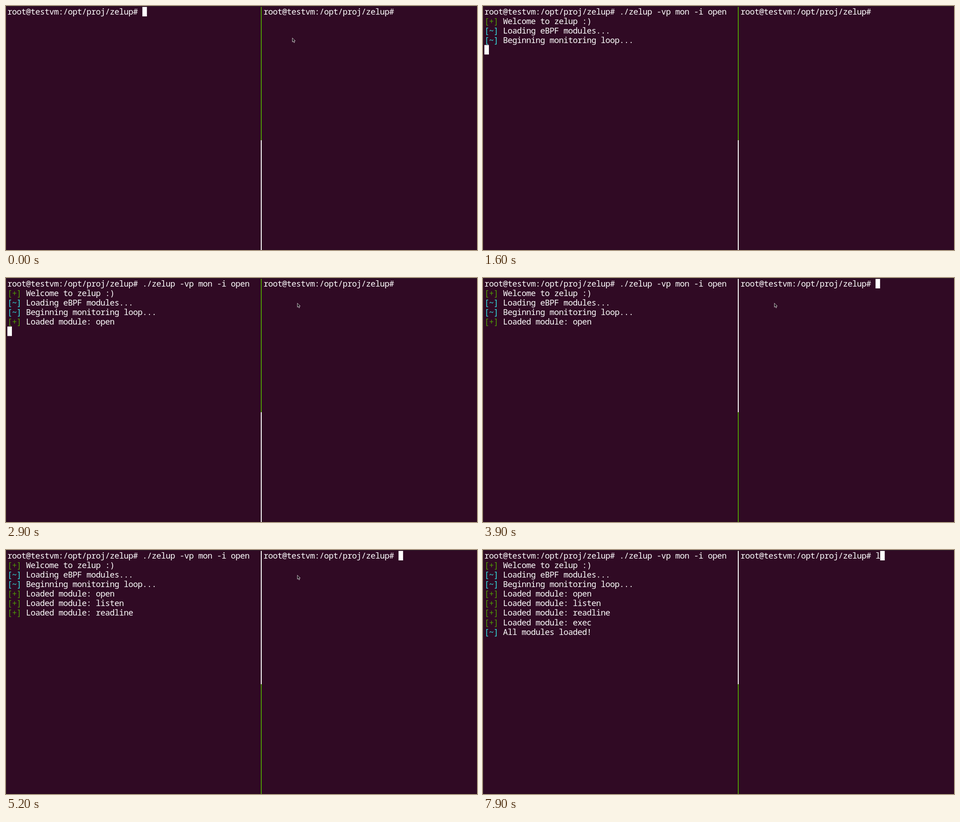
An HTML page that plays this animation: 1037x540 px, repeating every 8000 ms.

```html
<!DOCTYPE html>
<html lang="en">
<head>
<meta charset="utf-8">
<title>Split terminal</title>
<style>
  :root { --col: 10.25px; --row: 21.08px; --green: #4e9a06; --cyan: #34e2e2; }
  html, body { margin: 0; width: 100%; height: 100%; overflow: hidden; background: #300a24; }
  #stage {
    position: relative; width: 1037px; height: 540px; overflow: hidden;
    box-sizing: border-box; background: #300a24;
    box-shadow: inset 0 1px #2c2229, inset 1px 0 #2f1b25, inset 0 -1px #290a20;
  }
  #stage > * { position: absolute; }
  pre {
    margin: 0; top: 2px; color: #fff;
    font: 18px/var(--row) "Noto Sans Mono", "DejaVu Sans Mono", monospace;
    letter-spacing: -.55px; font-variant-ligatures: none;
  }
  .left { left: 3px; }
  .right { left: 567px; }
  .ok { color: var(--green); }
  .info { color: var(--cyan); }
  .ok, .info { font-weight: 500; }

  .cursor { top: 1.6px; width: var(--col); height: var(--row); background: #fff; }
  .divider { left: 561px; width: 2px; }
  .upper { top: 2px; height: 295px; background: var(--green); }
  .lower { top: 297px; height: 243px; background: #fff; }
  #mouse { left: 0; top: 0; overflow: visible; }

  /* 1% of the loop is 80 ms; every change is a hard cut */
  .step, .cursor, .divider, #mouse { animation: 8s step-end infinite; }
  .command { animation-name: command; }
  .boot { animation-name: boot; }
  .open { animation-name: open; }
  .listen { animation-name: listen; }
  .readline { animation-name: readline; }
  .exec { animation-name: exec; }
  .typed { animation-name: typed; }
  .cursor.left { animation-name: left-cursor; }
  .cursor.right { animation-name: right-cursor; }
  .upper { animation-name: upper; }
  .lower { animation-name: lower; }
  #mouse { animation-name: mouse; }

  @keyframes command { 0% { opacity: 0 } 15%, 100% { opacity: 1 } }
  @keyframes boot { 0% { opacity: 0 } 20%, 100% { opacity: 1 } }
  @keyframes open { 0% { opacity: 0 } 26.25%, 100% { opacity: 1 } }
  @keyframes listen { 0% { opacity: 0 } 60%, 100% { opacity: 1 } }
  @keyframes readline { 0% { opacity: 0 } 65%, 100% { opacity: 1 } }
  @keyframes exec { 0% { opacity: 0 } 88.75%, 100% { opacity: 1 } }
  @keyframes typed { 0% { opacity: 0 } 98.75%, 100% { opacity: 1 } }
  @keyframes upper { 0% { background: var(--green) } 38.75%, 100% { background: #fff } }
  @keyframes lower { 0% { background: #fff } 38.75%, 100% { background: var(--green) } }

  @keyframes left-cursor {
    0%, 12.5% { opacity: 1; transform: translate(calc(29 * var(--col)), 0) }
    3.75% { opacity: 0; transform: translate(calc(29 * var(--col)), 0) }
    15% { opacity: 1; transform: translate(calc(52 * var(--col)), 0) }
    20% { opacity: 1; transform: translate(0, calc(4 * var(--row))) }
    26.25% { opacity: 0; transform: translate(0, calc(5 * var(--row))) }
    32.5% { opacity: 1; transform: translate(0, calc(5 * var(--row))) }
    38.75%, 100% { opacity: 0; transform: translate(0, calc(5 * var(--row))) }
  }
  @keyframes right-cursor {
    0%, 40%, 56.25%, 86.25% { opacity: 0; transform: translate(calc(29 * var(--col)), 0) }
    38.75%, 48.75%, 62.5%, 92.5% { opacity: 1; transform: translate(calc(29 * var(--col)), 0) }
    98.75%, 100% { opacity: 1; transform: translate(calc(30 * var(--col)), 0) }
  }
  @keyframes mouse {
    0% { opacity: 1; transform: translate(630px, 70px) }
    15% { opacity: 0; transform: translate(632px, 67px) }
    33.75% { opacity: 1; transform: translate(632px, 67px) }
    36.25% { opacity: 1; transform: translate(641px, 55px) }
    98.75%, 100% { opacity: 0; transform: translate(641px, 55px) }
  }
</style>
</head>
<body>
<div id="stage">
  <pre class="left">root@testvm:/opt/proj/zelup# <span class="step command">./zelup -vp mon -i open</span>
<span class="step boot"><span class="ok">[+]</span> Welcome to zelup :)
<span class="info">[~]</span> Loading eBPF modules...
<span class="info">[~]</span> Beginning monitoring loop...</span>
<span class="step open"><span class="ok">[+]</span> Loaded module: open</span>
<span class="step listen"><span class="ok">[+]</span> Loaded module: listen</span>
<span class="step readline"><span class="ok">[+]</span> Loaded module: readline</span>
<span class="step exec"><span class="ok">[+]</span> Loaded module: exec
<span class="info">[~]</span> All modules loaded!</span></pre>
  <pre class="right">root@testvm:/opt/proj/zelup# <span class="step typed">l</span></pre>
  <div class="divider upper"></div>
  <div class="divider lower"></div>
  <div class="cursor left"></div>
  <div class="cursor right"></div>
  <svg id="mouse" width="8" height="12">
    <path d="M.5 .7V9.6L2.6 7.8 4 11.2 5.6 10.5 4.2 7.2H7Z" fill="#1c1319" stroke="#d6d0d4" stroke-width=".9"/>
  </svg>
</div>
</body>
</html>
```
